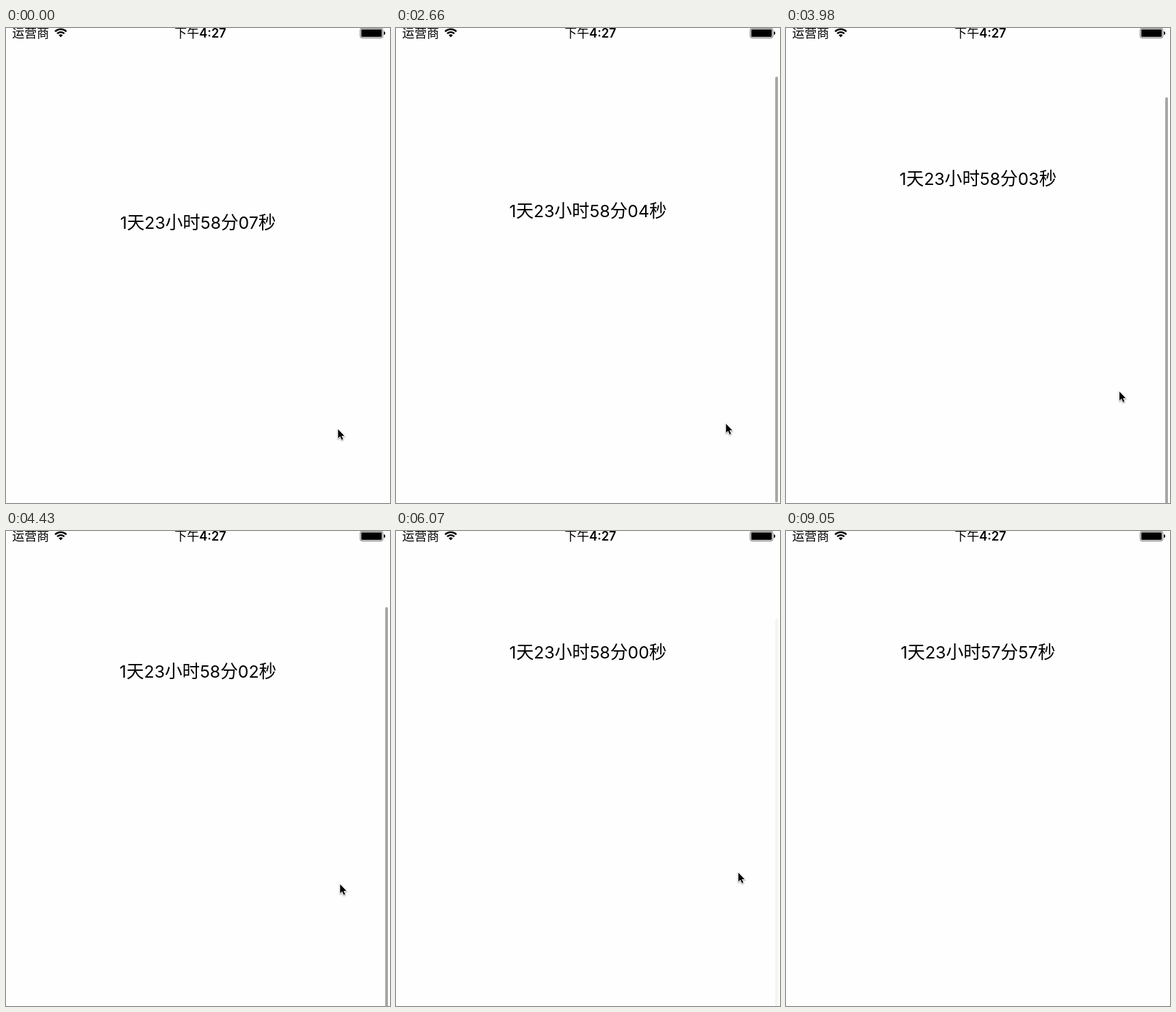
An HTML page with a canvas that plays this animation: 561 by 693 pixels, repeating every 9.19 s.

```html
<!DOCTYPE html>
<html lang="zh-CN">
<head>
<meta charset="utf-8">
<title>倒计时</title>
<style>
  html, body { margin: 0; width: 100%; height: 100%; overflow: hidden; background: #fefefe; }
  canvas { display: block; }
</style>
</head>
<body>
<canvas id="stage" width="561" height="693"></canvas>
<script>
const ctx = document.getElementById('stage').getContext('2d');
const LOOP = 9190;
const STEP_MS = 147.4;          // the picture changes on this beat
const STEPS_PER_SECOND = 6.66;
const DRAG_START = 15, RELEASE = 35, LEAVE = 41;   // in steps
const FINAL_OFFSET = 107;
const LATIN = 'Inter, Roboto, sans-serif';
const HAN = '"Noto Sans CJK SC", "Noto Sans CJK", sans-serif';

const clamp01 = v => Math.min(1, Math.max(0, v));

// The finger slows a little while dragging, then a flick carries the page to rest
function scrollOffset(step) {
  if (step >= RELEASE) return FINAL_OFFSET;
  const n = Math.max(0, step - DRAG_START);
  return Math.round(5.9 * n - 0.044 * n * n);
}

function cursorAt(step) {
  if (step < DRAG_START) {
    const p = clamp01((step - 3) / 5);
    return [485 - 5 * p, 585 + 24 * p * p];
  }
  if (step < LEAVE) {
    const n = Math.min(step, RELEASE) - DRAG_START;
    return [480.9 + 0.47 * n, 594 - scrollOffset(step)];
  }
  const n = step - LEAVE;
  return [500 + 5 * n, 498 + 14 * n * n];
}

function barAlpha(step) {
  if (step <= DRAG_START || step > LEAVE) return 0;
  return step < LEAVE ? 0.35 : 0.04;
}

function countdown(step) {
  const elapsed = Math.floor((step - 1) / STEPS_PER_SECOND) + 1;
  const left = 58 * 60 + 7 - elapsed;
  const pad = n => String(n).padStart(2, '0');
  return `1天23小时${pad(Math.floor(left / 60))}分${pad(left % 60)}秒`;
}

// Sets Latin and Han runs in their own faces; returns the total width
function layRuns(text, x, y, latinFont, hanFont, paint) {
  const start = x;
  for (const run of text.match(/[\x20-\x7e]+|[^\x20-\x7e]+/g)) {
    ctx.font = /[\x20-\x7e]/.test(run) ? latinFont : hanFont;
    if (paint) ctx.fillText(run, x, y);
    x += ctx.measureText(run).width;
  }
  return x - start;
}

function centredText(text, cx, y, latinFont, hanFont) {
  const width = layRuns(text, 0, y, latinFont, hanFont, false);
  layRuns(text, cx - width / 2, y, latinFont, hanFont, true);
}

function roundRect(x, y, w, h, r) {
  ctx.beginPath();
  ctx.roundRect(x, y, w, h, r);
}

function drawWifi(x, y) {
  const from = -Math.PI * 0.75, to = -Math.PI * 0.25;
  for (let ring = 0; ring < 3; ring++) {
    const outer = 4.2 + 4.35 * ring;
    ctx.beginPath();
    ctx.arc(x, y, outer, from, to);
    ctx.arc(x, y, ring && outer - 2.5, to, from, true);
    ctx.fill();
  }
}

function drawBattery() {
  ctx.strokeStyle = 'rgba(0,0,0,0.6)';
  ctx.lineWidth = 1;
  roundRect(517.5, 0.5, 33, 14, 2.5);
  ctx.stroke();
  roundRect(519, 2, 30, 11, 1.2);
  ctx.fill();
  roundRect(552, 5, 2, 5, [0, 2, 2, 0]);
  ctx.fill();
}

function drawStatusBar() {
  ctx.font = '18px ' + HAN;
  ctx.fillText('运营商', 9, 14);
  drawWifi(80, 13.4);
  centredText('下午4:27', 284, 14, '600 18px ' + LATIN, '500 18px ' + HAN);
  drawBattery();
}

function drawScrollBar(offset, alpha) {
  ctx.fillStyle = `rgba(0,0,0,${alpha})`;
  roundRect(554, Math.round(60.2 + offset * 0.638), 4, 621, 2);
  ctx.fill();
}

function drawCursor(x, y) {
  const arrow = new Path2D('M0 0V13L3 10.3 5.2 15.4 7.3 14.5 5.1 9.5H9Z');
  ctx.save();
  ctx.translate(Math.round(x) + 0.2, Math.round(y) + 0.4);
  ctx.lineWidth = 1.6;
  ctx.strokeStyle = '#fff';
  ctx.shadowColor = 'rgba(0,0,0,0.45)';
  ctx.shadowBlur = 2;
  ctx.shadowOffsetY = 1;
  ctx.stroke(arrow);
  ctx.shadowColor = 'transparent';
  ctx.fillStyle = '#000';
  ctx.fill(arrow);
  ctx.restore();
}

function draw(t) {
  const step = Math.floor(t / STEP_MS);
  const offset = scrollOffset(step);
  ctx.fillStyle = '#fefefe';
  ctx.fillRect(0, 0, 561, 693);
  ctx.fillStyle = '#000';
  drawStatusBar();
  centredText(countdown(step), 280.5, 293 - offset, '24.8px ' + LATIN, '25.6px ' + HAN);
  drawScrollBar(offset, barAlpha(step));
  drawCursor(...cursorAt(step));
}

const begin = performance.now();
function loop() {
  draw((performance.now() - begin) % LOOP);
  requestAnimationFrame(loop);
}
loop();
</script>
</body>
</html>
```
